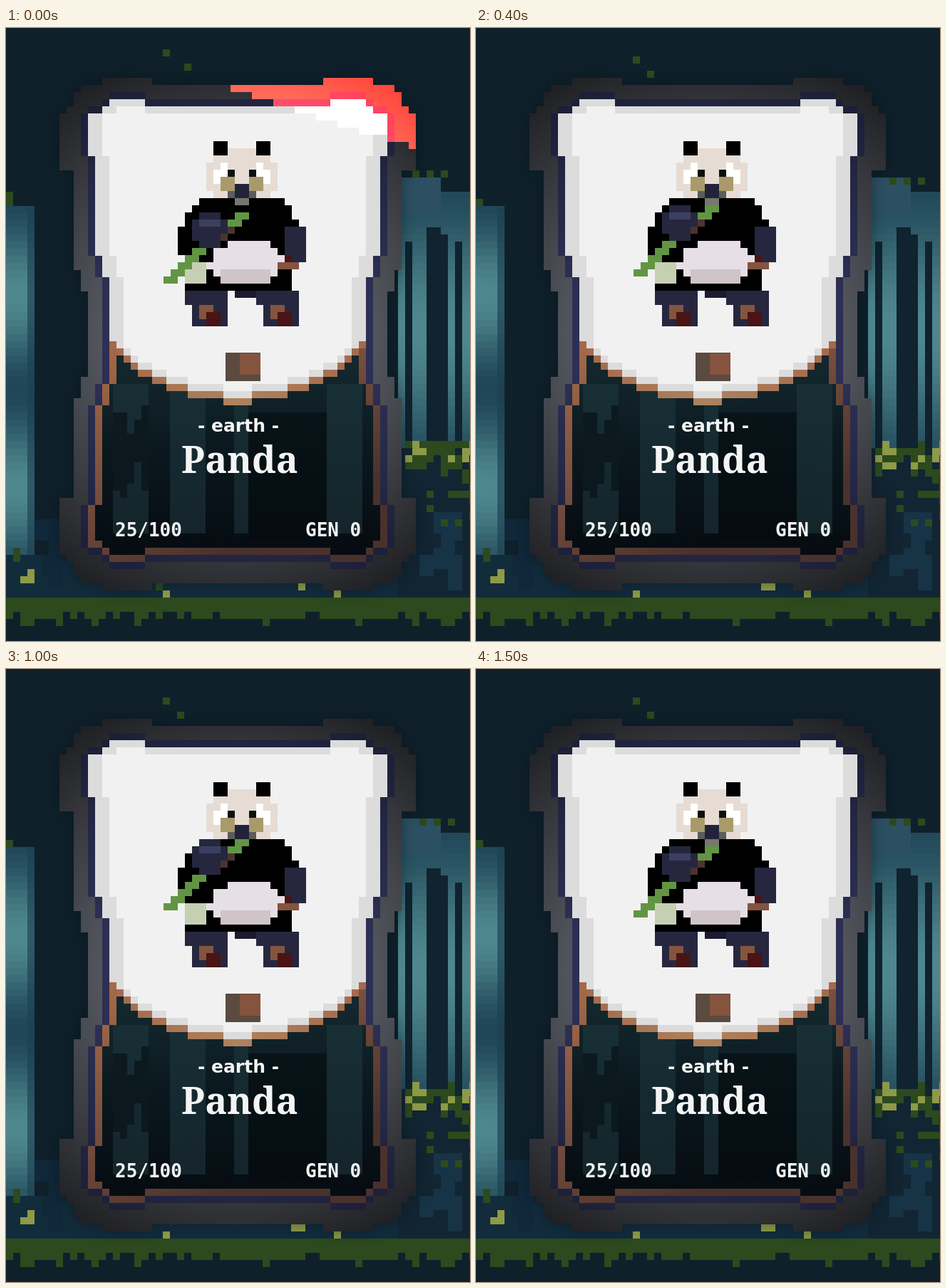
These frames come from a looping animation (651x861 px, 1600 ms). An HTML page with a canvas:

```html
<!DOCTYPE html>
<html lang="en">
<head>
<meta charset="utf-8">
<title>Panda card</title>
<style>
  html, body { margin: 0; width: 651px; height: 861px; overflow: hidden; background: #0f202b; }
  canvas, svg { position: absolute; left: 0; top: 0; }
  text { fill: #f4f4f4; }
  .small { font: bold 26px "DejaVu Sans Mono", monospace; }
  .kind { font: bold 25px "DejaVu Sans", sans-serif; }
  .name { font: 900 52px "Noto Serif", serif; }
</style>
</head>
<body>
<canvas id="stage" width="651" height="861"></canvas>
<svg width="651" height="861">
  <text class="kind" x="326" y="567" text-anchor="middle">- earth -</text>
  <text class="name" x="328" y="625" text-anchor="middle">Panda</text>
  <text class="small" x="153" y="714">25/100</text>
  <text class="small" x="420" y="714">GEN 0</text>
</svg>
<script>
const ctx = document.getElementById('stage').getContext('2d');
const STEP = 100, LOOP = 1600, CELL = 10;
const LEAF = '#2c4a1e', MOSS = '#8d9a47', NIGHT = '#0f202b';
const NAVY = '#26273f', BROWN = '#84543f', MAROON = '#4a1414', BAMBOO = '#629543';

const snap = v => Math.floor(v / CELL) * CELL;
const clamp = v => Math.min(1, Math.max(0, v));

function seeded(seed) {
  return () => {
    seed = (seed * 1664525 + 1013904223) % 4294967296;
    return seed / 4294967296;
  };
}

function mix(a, b, t) {
  return `rgb(${a.map((v, i) => Math.round(v + (b[i] - v) * t))})`;
}

// All boxes are given in cells.
function box(color, x, y, w = 1, h = 1) {
  ctx.fillStyle = color;
  ctx.fillRect(x * CELL, y * CELL, w * CELL, h * CELL);
}

function oval(color, cx, cy, rx, ry) {
  for (let y = Math.floor(cy - ry); y < cy + ry; y++) {
    const k = 1 - ((y + .5 - cy) / ry) ** 2;
    if (k <= 0) continue;
    const half = rx * Math.sqrt(k);
    const left = Math.round(cx - half);
    box(color, left, y, Math.round(cx + half) - left, 1);
  }
}

// Misty light that swells and fades with height.
function mist(x0, x1, y0, y1, peak, wave) {
  for (let x = x0; x < x1; x++) {
    for (let y = y0; y < y1; y++) {
      const glow = .48 + .4 * Math.cos((y - peak) / wave * 2 * Math.PI);
      const edge = x === 3 ? .35 : 1;
      box(mix([27, 64, 82], [86, 145, 150], glow * edge), x, y);
    }
  }
}

function forest(sway) {
  const rnd = seeded(11);
  box(NIGHT, 0, 0, 66, 87);
  box('#122c3c', 0, 74, 56, 6);
  box('#122532', 55, 59, 11, 21);

  mist(0, 4, 25, 74, 37, 27);
  mist(55, 66, 23, 59, 42, 44);
  box('#2c5062', 55, 21, 6, 5);
  for (let x = 56; x < 64; x += 2) {
    const top = 28 + Math.floor(rnd() * 12);
    box('#10232f', x + (rnd() > .5), top, 1 + (rnd() > .4), 59 - top);
  }

  // patches on the forest floor
  for (let i = 0; i < 16; i++) {
    box(i % 2 ? '#173346' : '#10283a', (i % 2 ? 56 : 4) + Math.floor(rnd() * 8),
      68 + Math.floor(rnd() * 9), 2, 3);
  }

  // the bush hangs lower when the wind blows
  for (let y = 58; y < 70; y++) {
    for (let x = 56; x < 66; x++) {
      const depth = y - 58 - sway;
      const cover = depth < 0 ? .4 : depth < 4 ? .85 - depth * .15 : .2;
      const pick = rnd();
      if (pick < cover) box(depth < 3 && pick < .25 ? MOSS : LEAF, x, y);
    }
  }

  box(LEAF, 22, 3 + sway);
  box(LEAF, 25 - sway, 5 + sway);
  box(LEAF, 0, 23 + sway, 1, 2 - sway);
  for (let x = 57; x < 62; x += 2) box(LEAF, x + sway, 20 + sway);

  box(LEAF, 1, 73, 1, 2);
  box(MOSS, 3, 76);
  box(MOSS, 2, 77, 2);
  for (const x of [22, 46]) box(MOSS, x, 79);
  box(MOSS, 41 - sway, 78, 1 + sway);
  box(LEAF, 21 - sway, 77, 1, 2 - sway);

  box(LEAF, 0, 80, 66, 2);
  for (let x = 0; x < 66; x++) box(LEAF, x, 82, 1, Math.floor(.75 + rnd() * 1.5));
}

// Stepped outline from one quarter: a start y, then x and y by turns.
function frame(middle, steps) {
  const q = [];
  let x = 325, y;
  steps.forEach((v, i) => {
    if (i % 2) x = v; else y = v;
    q.push([x, y]);
  });
  const flipX = ([x, y]) => [650 - x, y], flipY = ([x, y]) => [x, 2 * middle - y];
  const lower = q.map(flipY).reverse();
  const pts = [...q, ...lower, ...lower.map(flipX).reverse(), ...q.map(flipX).reverse()];
  return new Path2D('M' + pts.join('L') + 'Z');
}

const OUTER = frame(430, [80, 205, 70, 135, 80, 105, 90, 95, 110, 85, 120, 75, 200, 95, 340, 105, 370, 115]);
const INNER = frame(425, [110, 195, 100, 145, 110, 135, 120, 115, 180, 125, 320, 135, 350, 145]);

const BOWL = new Path2D();
for (let x = 95; x < 555; x += CELL) {
  const d = Math.abs(x + 5 - 325);
  const y = 523 - .12 * d - 72 * (1 - Math.sqrt(Math.max(0, 1 - (d / 180) ** 2)));
  BOWL.rect(x, 90, CELL, snap(y) - 90);
}

const around = (dx, dy) => [[dx, 0], [-dx, 0], [0, dy], [0, -dy]];

function grow(path, style) {
  for (const [dx, dy] of around(CELL, CELL)) fill(path, style, dx, dy);
}

function fill(path, style, dx = 0, dy = 0) {
  ctx.save();
  ctx.fillStyle = style;
  ctx.translate(dx, dy);
  ctx.fill(path);
  ctx.restore();
}

// Draws where every shifted copy of the path overlaps.
function inside(path, shifts, draw) {
  ctx.save();
  for (const [dx, dy] of shifts) {
    ctx.translate(dx, dy);
    ctx.clip(path);
    ctx.translate(-dx, -dy);
  }
  draw();
  ctx.restore();
}

function stops(g, colors) {
  colors.forEach((c, i) => g.addColorStop(i / (colors.length - 1), c));
  return g;
}
const radial = (...colors) => stops(ctx.createRadialGradient(325, 430, 190, 325, 430, 410), colors);
const linear = (x0, y0, x1, y1, ...colors) => stops(ctx.createLinearGradient(x0, y0, x1, y1), colors);

function card() {
  ctx.save();
  ctx.shadowColor = 'rgba(5,14,22,.4)';
  ctx.shadowBlur = 20;
  fill(OUTER, '#33353a');
  ctx.restore();
  fill(OUTER, radial('#52555c', '#1f2023'));
  grow(INNER, radial('#2d3054', '#191b32'));
  fill(INNER, linear(145, 430, 300, 740, '#a96c47', '#7a5140', '#4a322c'));

  inside(INNER, around(CELL, CELL), () => {
    ctx.fillStyle = linear(0, 470, 0, 735, '#13282e', '#0a171d', '#060c11');
    ctx.fillRect(115, 420, 420, 330);
    const rnd = seeded(5);
    ctx.globalAlpha = .55;
    for (const [x, w] of [[15, 5], [23, 5], [32, 2], [45, 5]]) box('#1f3a40', x, 50, w, 21);
    for (let x = 15; x < 20; x++) box('#040b10', x, 53 + rnd() * 6 | 0, 1, 4 + rnd() * 10 | 0);
    box('#040b10', 34, 54, 11, 18);
    ctx.globalAlpha = 1;
  });

  inside(INNER, [[0, 0]], () => {
    fill(BOWL, linear(145, 0, 505, 0, '#a5684a', '#ad835e', '#a5684a'), 0, CELL);
    fill(BOWL, '#dcdcdc');
    inside(INNER, around(2 * CELL, CELL), () => fill(BOWL, '#f1f1f1', 0, -CELL));
  });

  ctx.fillStyle = '#5b4a3f';
  ctx.fillRect(308, 456, 49, 40);
  ctx.fillStyle = BROWN;
  ctx.fillRect(328, 457, 29, 30);
}

// The same box on both sides of the face.
function pair(color, x, y, w = 1, h = 1) {
  box(color, x, y, w, h);
  box(color, 22 - x - w, y, w, h);
}

function panda(lift, crumbs) {
  ctx.save();
  ctx.translate(221, 159);

  // body
  box('#000', 3, 19, 15, 2);
  oval('#000', 10.8, 14, 8.7, 7.3);
  oval('#e6dfe6', 11.6, 17.2, 5.2, 3.3);
  box('#cfc4c8', 8, 18, 7, 2);
  box('#c5d0b3', 3, 17, 3, 3);
  oval(NAVY, 18.3, 14.5, 1.8, 3);
  box(BROWN, 16, 17, 3);
  box(MAROON, 17, 16);

  // legs
  box('#1b1a30', 10, 21, 3);
  for (const x of [3, 13]) {
    box(NAVY, x, 21, 6, 2);
    box(NAVY, x + 1, 23, 5, 3);
    box(BROWN, x + 2, 23, 2, 2);
    box(MAROON, x + 3, 24, 2, 2);
  }

  // head
  box('#e6dcd4', 7, 1, 8, 7);
  box('#e6dcd4', 6, 3, 10, 4);
  box('#f1f1f1', 9, 0, 4);
  pair('#000', 7, 0, 2, 2);
  pair('#fff', 7, 4, 2, 2);
  pair('#fff', 8, 3);
  pair('#0a1210', 9, 4);
  pair('#a99a6c', 8, 5, 2, 2);
  box('#22233a', 10, 6, 2, 2);
  pair('#5c5c5a', 9, 7);
  box('#77776f', 10, 8, 2);

  // bamboo and the paw that lifts it
  for (let i = 0; i < 10; i++) box(BAMBOO, Math.round(10 - i * 10 / 9), 10 + i - lift, 2);
  oval(NAVY, 6.5, 12.5 - lift, 2.5, 2.2);
  box('#3b4060', 5, 11 - lift, 3);
  box('#4b3430', 8, 13 - lift);
  box('#4b3430', 9, 12 - lift);

  if (crumbs) for (const [x, y] of [[17, 4], [5, 6], [18, 7]]) box(BAMBOO, x, y);
  ctx.restore();
}

// A slanted band of light that speeds up on its way down.
function sweep(i) {
  const low = 20 + 109 * i + 36.3 * i * i;
  const heat = clamp(1 - Math.abs(i - 2));
  const thick = 127 + 28 * heat;
  inside(OUTER, [[0, 0]], () => {
    ctx.globalCompositeOperation = 'color-dodge';
    ctx.fillStyle = `rgb(230,${137 + 25 * heat},103)`;
    for (let x = 75; x < 575; x += CELL) {
      const bottom = low + .325 * (x - 95);
      ctx.fillRect(x, snap(bottom - thick), CELL, snap(bottom) - snap(bottom - thick));
    }
  });
}

function render(i) {
  const windy = i > 2 && (i + 1) % 7 > 1;
  const chew = [0, 0, 1, 2, 3, 2, 3, 2, 1][(i + 1) >> 1];
  forest(+windy);
  card();
  panda(Math.min(chew, 2), chew === 3);
  if (i < 4) sweep(i);
}

const start = performance.now();
let shown = -1;
function tick() {
  const i = Math.floor((performance.now() - start) % LOOP / STEP);
  if (i !== shown) render(shown = i);
  requestAnimationFrame(tick);
}
tick();
</script>
</body>
</html>
```
